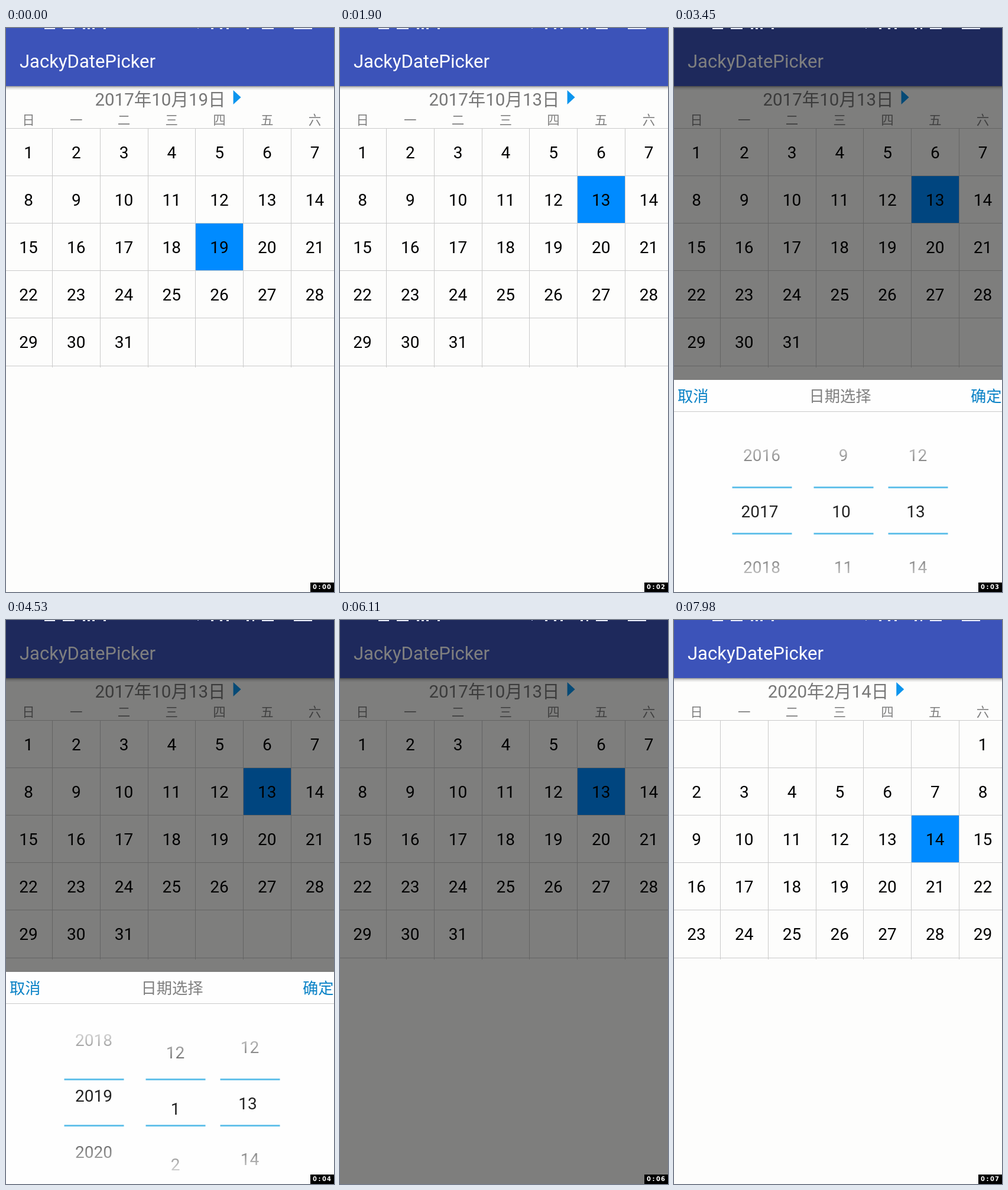
Recreate the animation shown at these times as an HTML page with a canvas. Size 555 px wide and 952 px high, loop 8 s.

```html
<!DOCTYPE html>
<html lang="zh">
<head>
<meta charset="utf-8">
<title>Date picker</title>
<style>
html, body { margin: 0; width: 100%; height: 100%; overflow: hidden; background: #fdfdfc; }
canvas { display: block; width: 555px; height: 952px; }
</style>
</head>
<body>
<canvas id="stage" width="555" height="952"></canvas>
<script>
const ctx = document.getElementById('stage').getContext('2d');
const W = 555, H = 952, LOOP = 8000;
const FONT = 'Roboto, "Noto Sans CJK SC", "Noto Sans CJK", sans-serif';
const OPEN = 3360, OPENED = 3450, CLOSE = 5640, HIDDEN = 6090, CLOSED = 6170;
const PANEL_TOP = 594, ROW_STEP = 94.5;

// [start ms, year, month, day]
const SELECTIONS = [
  [0, 2017, 10, 19], [150, 2017, 10, 18], [1220, 2017, 10, 17], [1840, 2017, 10, 13],
  [6170, 2020, 2, 13], [7180, 2020, 2, 18], [7610, 2020, 2, 5], [7980, 2020, 2, 14]
];
const SECONDS = [0, 920, 1840, 2950, 3910, 4880, 5860, 6930];

// [start ms, end ms, from, to]
const YEAR_MOVES = [[4000, 4300, 2017, 2017.3], [4300, 5080, 2017.3, 2020.106], [5180, 5560, 2020.106, 2020]];
const MONTH_MOVES = [[4000, 4780, 10, 13], [5180, 5620, 13, 14]];

const colX = i => Math.floor(78.7 + 80.75 * i);
const rowY = r => Math.floor(169.2 + 80.17 * r);
const easeOut = p => 1 - (1 - p) ** 3;
const current = (list, t) => list.filter(s => s[0] <= t).pop();

function moved(moves, t) {
  let value = moves[0][2];
  for (const [start, end, from, to] of moves) {
    if (t >= start) value = from + (to - from) * easeOut(Math.min(1, (t - start) / (end - start)));
  }
  return value;
}

function rect(x, y, w, h, color) {
  ctx.fillStyle = color;
  ctx.fillRect(x, y, w, h);
}

function text(str, x, y, size, color, align = 'center', font = FONT) {
  ctx.font = size + 'px ' + font;
  ctx.textAlign = align;
  ctx.fillStyle = color;
  ctx.fillText(str, x, y);
}

function drawToolbar() {
  const shadow = ctx.createLinearGradient(0, 98, 0, 105);
  shadow.addColorStop(0, 'rgba(0,0,0,.42)');
  shadow.addColorStop(0.4, 'rgba(0,0,0,.14)');
  shadow.addColorStop(1, 'rgba(0,0,0,0)');
  rect(0, 98, W, 7, shadow);
  rect(0, 0, W, 98, '#3c53b9');
  text('JackyDatePicker', 23, 67, 31, '#fff', 'left');
}

function drawCalendar(year, month, day) {
  const title = `${year}年${month}月${day}日`;
  text(title, 261, 131, 29.5, '#777');
  const ax = 261 + ctx.measureText(title).width / 2 + 13;
  ctx.fillStyle = '#0c95ee';
  ctx.beginPath();
  ctx.moveTo(ax, 105);
  ctx.lineTo(ax + 13, 117);
  ctx.lineTo(ax, 129);
  ctx.fill();

  [...'日一二三四五六'].forEach((name, i) => text(name, 38 + 80.75 * i, 163, 21.5, '#808080'));

  const first = new Date(year, month - 1, 1).getDay();
  const count = new Date(year, month, 0).getDate();
  const cell = first + day - 1, col = cell % 7, row = Math.floor(cell / 7);
  const left = col ? colX(col - 1) + 1 : 0;
  rect(left, rowY(row) + 1, colX(col) - left, rowY(row + 1) - rowY(row) - 1, '#008bff');

  for (let r = 0; r < 6; r++) rect(0, rowY(r), W, 1, '#cacaca');
  for (let c = 0; c < 6; c++) rect(colX(c), 169, 1, 404, '#cacaca');
  for (let d = 1; d <= count; d++) {
    const n = first + d - 1;
    text(d, 38 + 80.75 * (n % 7), 220 + 80 * Math.floor(n / 7), 28, '#000');
  }
}

function drawWheel(x, value, label, idle) {
  const fade = ctx.createLinearGradient(0, 681, 0, 949);
  fade.addColorStop(0, 'rgba(34,34,34,0)');
  fade.addColorStop(0.35, 'rgba(34,34,34,1)');
  fade.addColorStop(0.65, 'rgba(34,34,34,1)');
  fade.addColorStop(1, 'rgba(34,34,34,0)');
  const mid = Math.round(value);
  for (let v = mid - 2; v <= mid + 2; v++) {
    const shift = idle && v === mid ? -3.5 : 0;
    text(label(v), x + shift, 825.5 + (v - value) * ROW_STEP, 28, fade);
  }
  for (const y of [774, 852]) rect(x - 50, y, 101, 3, '#66c2ea');
}

function drawPanel(t) {
  let slide = 0;
  if (t < OPENED) slide = 0.5;
  if (t > CLOSE) slide = Math.min(1, (t - CLOSE) / (HIDDEN - CLOSE)) ** 2;
  if (slide >= 1) return;
  ctx.save();
  ctx.translate(0, slide * (H - PANEL_TOP));
  rect(0, PANEL_TOP, W, H - PANEL_TOP, '#fefefe');
  text('取消', 6, 631, 26.3, '#0a82c6', 'left');
  text('日期选择', 281, 631, 26.3, '#808080');
  text('确定', 502, 631, 26.3, '#0a82c6', 'left');
  rect(0, 647, W, 1, '#cbcbcb');
  const year = moved(YEAR_MOVES, t), month = moved(MONTH_MOVES, t);
  drawWheel(148.5, year, v => v, year === 2017);
  drawWheel(286.5, month, v => (v - 1) % 12 + 1, month === 10);
  drawWheel(412.5, 13, v => v, true);
  ctx.restore();
}

// Lower edges of the cropped status icons
function drawStatus(t) {
  const wide = [[65, 18], [96, 20], [433, 20], [487, 31]];
  for (const [x, w] of wide) rect(x, 0, w, 2, '#e8ebfa');
  for (const x of [130, 138, 146, 165, 347, 362, 373]) rect(x, 0, 4, 2, '#dfe3f6');
  rect(407, 0, 4, 2, '#dfe3f6');
  if (t >= 920) rect(417, 0, 3, 2, '#dfe3f6');
  rect(324, 0, 2, 1, '#aeb8e4');
}

function drawTimer(t) {
  rect(515, 936, 40, 16, '#000');
  const sec = SECONDS.filter(s => s <= t).length - 1;
  [...`0:0${sec}`].forEach((ch, i) =>
    text(ch, 522.5 + 8 * i, 947, 'bold 10', '#fff', 'center', '"DejaVu Sans", sans-serif'));
}

function draw(t) {
  rect(0, 0, W, H, '#fdfdfc');
  drawToolbar();
  drawCalendar(...current(SELECTIONS, t).slice(1));
  if (t >= OPEN && t < CLOSED) {
    rect(0, 0, W, H, 'rgba(0,0,0,.5)');
    drawPanel(t);
  }
  drawStatus(t);
  drawTimer(t);
}

const begin = performance.now();
function tick() {
  draw((performance.now() - begin) % LOOP);
  requestAnimationFrame(tick);
}
tick();
</script>
</body>
</html>
```
